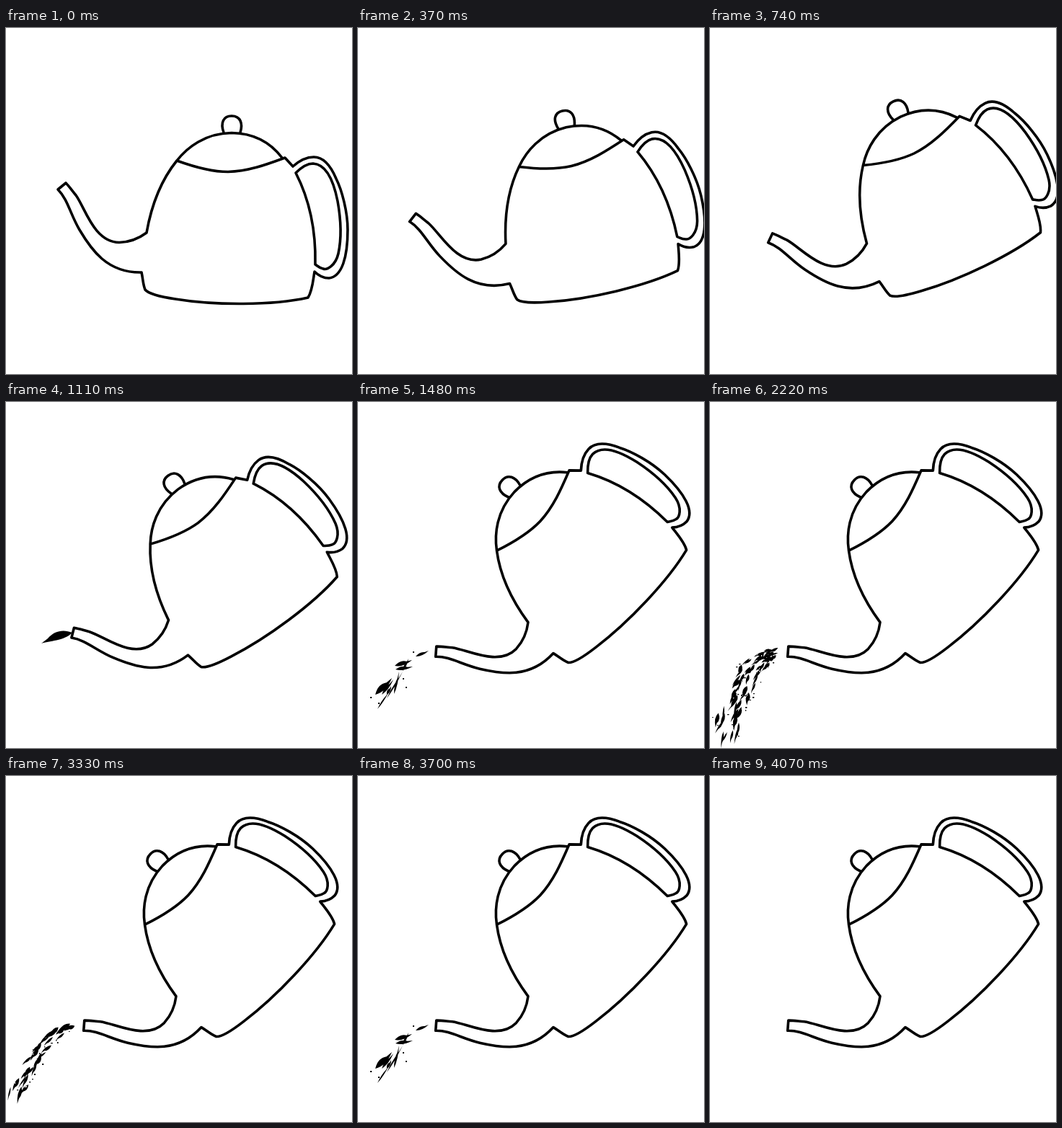
Write an HTML page with a canvas that moves like this. It is 480 by 480 pixels and loops after 4440 ms.

```html
<!DOCTYPE html>
<html lang="en">
<head>
<meta charset="utf-8">
<title>Pouring teapot</title>
<style>
html, body { margin: 0; width: 100%; height: 100%; overflow: hidden; background: #fff; }
canvas { display: block; }
</style>
</head>
<body>
<canvas id="stage" width="480" height="480"></canvas>
<script>
const ctx = document.getElementById('stage').getContext('2d');
const STEP = 370, STEPS = 12;
const PIVOT = [246, 299];

// Pivot position and tilt in degrees for each step of the pour
const POSES = [
  [246, 299, 0], [258, 302.5, -13], [270, 290.5, -25.5], [275.5, 284.5, -36.3], [282, 279, -46.4]
];

const teapot = new Path2D(`
  M237 184 C212 215 201 250 195 284 C187 290 175 297 157 297.5
  C122 297 110 250 97 232 C92 226 88 220 83 215 L72 224
  C86 238 89 258 102 280 C118 307 140 340 188 339
  C190 348 190 356 193 363 C198 369 215 373 235 376
  C290 385 370 385 419 374 C425 365 426 350 428 338
  C434 344 440 347 448 347 C466 345 474 318 474 280
  C474 255 466 225 458 209 C450 190 440 179 427 179
  C416 179 407 184 398 192 L387 180
  C360 190 335 199 308 199.5 C295 199.5 270 196 237 184
  C251 166 276 146 313 145.5 C348 146 370 163 383 180
  M402 201 C412 191 419 188 426 188 C445 189 455 215 460 240
  C464 262 466 290 461 313 C457 330 445 336 440 334
  C435 333 432 330 429 328 C430 285 422 240 402 201
  M302 145 C297 131 302 122 313 122 C325 122 329 132 325 145`);

const firstDrop = new Path2D('M92 320 C80 315 67 317 58 328 L49 335 C60 331 80 332 92 320');

function seeded(seed) {
  return () => (seed = seed * 16807 % 2147483647) / 2147483647;
}

// Adds a pointed, slightly bent streak
function addStreak(path, x1, y1, x2, y2, width) {
  const length = Math.hypot(x2 - x1, y2 - y1);
  const nx = (y1 - y2) / length * width, ny = (x2 - x1) / length * width;
  const at = (t, side) => [x1 + (x2 - x1) * t + nx * side, y1 + (y2 - y1) * t + ny * side];
  path.moveTo(x1, y1);
  path.quadraticCurveTo(...at(0.4, 1), x2, y2);
  path.lineTo(...at(0.7, -0.1));
  path.quadraticCurveTo(...at(0.4, -1), x1, y1);
}

function makeSplash() {
  const path = new Path2D();
  [
    [80, 353, 98, 345, 4], [51, 366, 75, 358, 6], [52, 371, 76, 367, 5],
    [62, 373, 70, 356, 3], [24, 406, 47, 383, 8], [33, 406, 49, 385, 4],
    [40, 406, 46, 394, 4], [50, 405, 57, 374, 3], [27, 426, 44, 400, 2], [40, 411, 62, 374, 2]
  ].forEach(streak => addStreak(path, ...streak));
  [[17, 409], [62, 383], [66, 395], [76, 346], [28, 417]].forEach(([x, y]) => path.rect(x, y, 2, 2));
  return path;
}

// Streaks and specks scattered along a falling curve
function makeStream({ endX, endY, bendY, spread, streaks, specks, seed }) {
  const path = new Path2D(), random = seeded(seed);
  const along = (t, a, b, c) => (1 - t) ** 2 * a + 2 * t * (1 - t) * b + t * t * c;
  const place = (t, offset) => {
    const x = along(t, 95, 48, endX), y = along(t, 346, bendY, endY);
    const dx = (1 - t) * -47 + t * (endX - 48), dy = (1 - t) * (bendY - 346) + t * (endY - bendY);
    const length = Math.hypot(dx, dy), shift = offset * spread * Math.min(1, 0.15 + t * 2.4);
    return { x: x - dy / length * shift, y: y + dx / length * shift, angle: Math.atan2(dy, dx) };
  };
  for (let i = 0; i < streaks; i++) {
    const t = 0.07 + 0.86 * (i + random()) / streaks;
    const { x, y, angle } = place(t, random() * 2 - 1);
    const half = 4 + random() * 4 + t * 5, tilt = angle + (random() - 0.5) * 0.6;
    const dx = Math.cos(tilt) * half, dy = Math.sin(tilt) * half;
    addStreak(path, x - dx, y - dy, x + dx, y + dy, 2 + random() * 4);
  }
  for (let i = 0; i < specks; i++) {
    const { x, y } = place(0.1 + random() * 0.8, (random() * 2 - 1) * 1.4);
    path.rect(Math.round(x), Math.round(y), 1 + random() * 2, 1 + random());
  }
  return path;
}

const splash = makeSplash();
const stream = makeStream({ endX: 6, endY: 460, bendY: 358, spread: 9, streaks: 32, specks: 16, seed: 71 });
const gush = makeStream({ endX: 12, endY: 490, bendY: 355, spread: 17, streaks: 56, specks: 34, seed: 29 });
const WATER = [null, null, null, firstDrop, splash, stream, gush, gush, gush, stream, splash, null];

function draw(step) {
  const [x, y, tilt] = POSES[Math.min(step, POSES.length - 1)];
  ctx.fillStyle = '#fff';
  ctx.fillRect(0, 0, 480, 480);
  ctx.save();
  ctx.translate(x, y);
  ctx.rotate(tilt * Math.PI / 180);
  ctx.translate(-PIVOT[0], -PIVOT[1]);
  ctx.lineWidth = 3.6;
  ctx.lineJoin = ctx.lineCap = 'round';
  ctx.strokeStyle = '#000';
  ctx.stroke(teapot);
  ctx.restore();
  if (WATER[step]) {
    ctx.fillStyle = '#000';
    ctx.fill(WATER[step]);
  }
}

const start = performance.now();
function tick() {
  draw(Math.floor((performance.now() - start) / STEP) % STEPS);
  requestAnimationFrame(tick);
}
tick();
</script>
</body>
</html>
```
